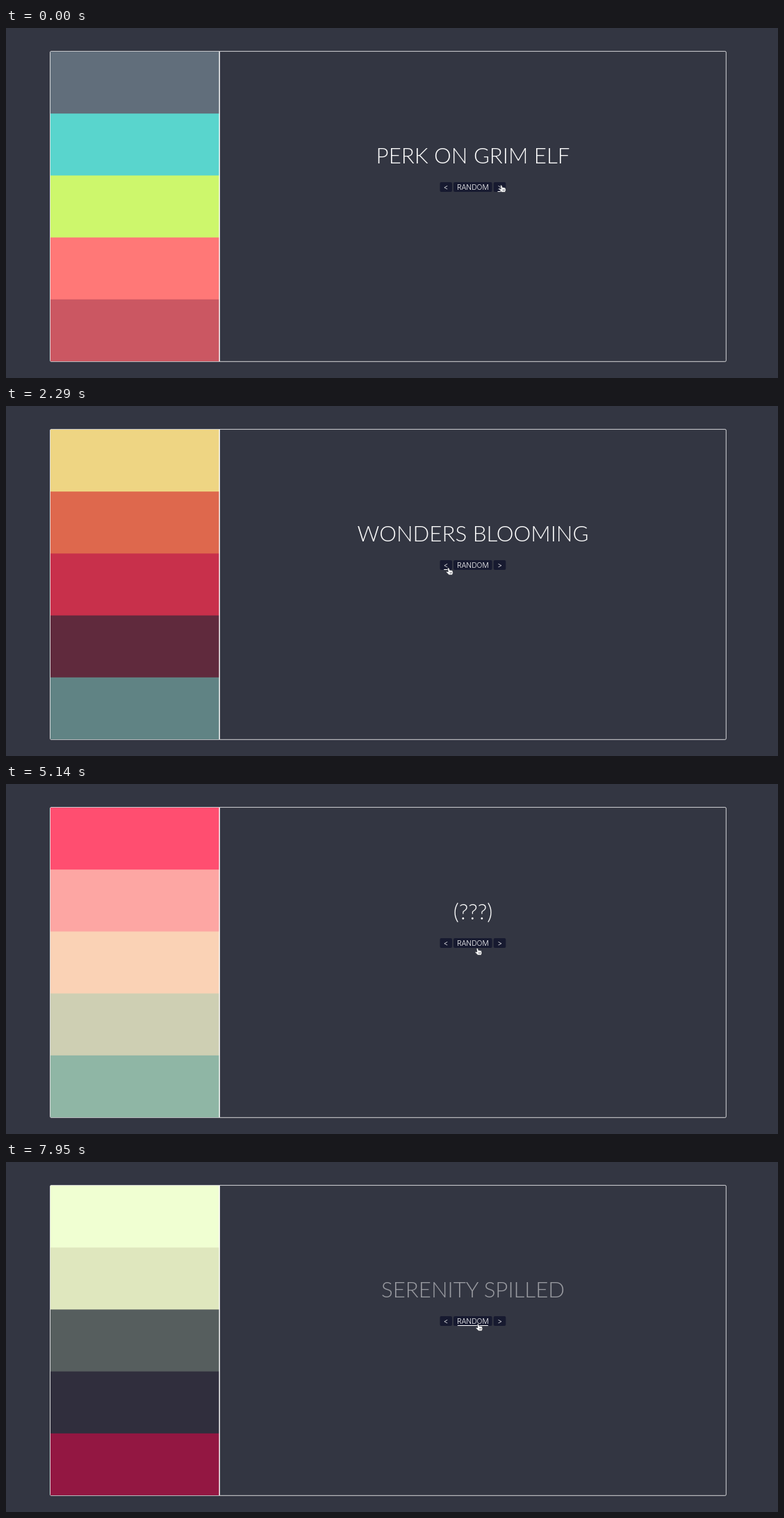
These frames come from a looping animation (1111 px wide and 504 px high, 8 s). An HTML page:

```html
<!DOCTYPE html>
<html lang="en">
<head>
<meta charset="utf-8">
<title>Palette browser</title>
<style>
  html, body { margin: 0; width: 100%; height: 100%; overflow: hidden; background: #333642; }
  svg { display: block; width: 1111px; height: 504px; }
  text { fill: #fff; text-anchor: middle; }
  #title { font: 300 31.25px Lato, sans-serif; }
  .button text { font: 300 10.3px Inter, sans-serif; }
  .button rect { fill: #171a30; }
  .button line { stroke: #fff; }
</style>
</head>
<body>
<svg viewBox="0 0 1111 504">
  <rect x="63.5" y="33.6" width="972.8" height="446.7" rx="1.5" fill="none" stroke="#fff" stroke-width=".8"/>
  <g id="swatches"></g>
  <rect x="306.5" y="34" width="1.4" height="446" fill="#fff"/>
  <text id="title" x="672" y="194.5"></text>
  <g id="buttons"></g>
  <g id="hand" stroke="#22242e" stroke-width=".7" stroke-linejoin="round">
    <path fill="#fff" d="M-1 1Q0-.6 1.2 1L2.2 3.8Q3.4 2.8 4.2 4Q5.6 3.4 6.4 4.8L6.9 7.6L5.8 10.4H1L-3 6.4Q-2.4 4.8-.2 6Z"/>
    <path fill="none" d="M2.5 6.4L2.9 8.6M4.4 6.2L4.7 8.4"/>
  </g>
</svg>
<script>
const LOOP = 8000, REFRESH = 150, COLOR_TIME = 440, FADE_OUT = 200, FADE_IN = 240;

// shown: first visible step of the change; lag: how far it has run by then
const scenes = [
  { shown: 0, lag: LOOP, title: "PERK ON GRIM ELF", colors: "616e7b 59d5cd cdf76c ff7877 cb5762" },
  { shown: 1720, lag: 65, title: "WONDERS BLOOMING", colors: "eed583 de684d c8304b 602a3d 608384" },
  { shown: 3370, lag: 180, title: "(???)", colors: "ff4e70 fda6a3 fad2b5 cecfb3 8fb6a5" },
  { shown: 6040, lag: 83, title: "SERENITY SPILLED", colors: "f0ffd2 dfe7be 615d5e 372d3c a31a44" },
  { shown: 7950, lag: 100, title: "", colors: "f0ffd2 dfe7be 07655e 003544 200034" }
].map(s => ({ ...s, colors: s.colors.split(" ").map(toRgb) }));

// Each move slows down towards (x, y) and sags by dip on the way
const home = { x: 712.5, y: 226 };
const moves = [
  { start: 100, end: 1420, x: 636.5, y: 232.8, dip: 16 },
  { start: 4150, end: 5140, x: 678, y: 236, dip: 21 },
  { start: 5200, end: 5590, x: 679, y: 232.8, dip: 0 }
];

const $ = id => document.getElementById(id);
const clamp = v => Math.max(0, Math.min(1, v));
const swing = v => 0.5 - 0.5 * Math.cos(Math.PI * clamp(v));
const easeOut = v => 1 - (1 - clamp(v)) ** 2;
const mix = (a, b, p) => a + (b - a) * p;

function toRgb(hex) {
  return [0, 2, 4].map(i => parseInt(hex.slice(i, i + 2), 16));
}

function add(parent, tag, attrs) {
  const node = document.createElementNS("http://www.w3.org/2000/svg", tag);
  for (const key in attrs) node.setAttribute(key, attrs[key]);
  return parent.appendChild(node);
}

// Every swatch reaches the bottom, so the next one covers it without a seam
const swatches = scenes[0].colors.map((_, i) =>
  add($("swatches"), "rect", { x: 64, y: 34 + i * 89.2, width: 243, height: 446 - i * 89.2 }));

const buttons = [["<", 633.2, 17.5], ["RANDOM", 671.8, 55.5], [">", 710.5, 17.5]]
  .map(([label, x, width]) => {
    const group = add($("buttons"), "g", { class: "button" });
    const half = width / 2, left = x - half, right = x + half;
    add(group, "rect", { x: left, y: 222, width, height: 14, rx: 2 });
    add(group, "text", { x, y: 232.8 }).textContent = label;
    const underline = add(group, "line", { x1: left + 5.8, x2: right - 5.8, y1: 235.5, y2: 235.5 });
    return { left, right, underline };
  });

function drawPalette(t) {
  const index = scenes.filter(s => s.shown <= t).length - 1;
  const next = scenes[index], prev = scenes[Math.max(0, index - 1)];
  const age = next.lag + Math.floor((t - next.shown) / REFRESH) * REFRESH;
  const p = swing(age / COLOR_TIME);
  swatches.forEach((node, i) => {
    const rgb = next.colors[i].map((c, k) => Math.round(mix(prev.colors[i][k], c, p)));
    node.setAttribute("fill", `rgb(${rgb})`);
  });
  const leaving = age < FADE_OUT;
  $("title").textContent = (leaving ? prev : next).title;
  $("title").setAttribute("opacity",
    leaving ? 1 - swing(age / FADE_OUT) : swing((age - FADE_OUT) / FADE_IN));
}

function drawPointer(t) {
  let { x, y } = home;
  for (const m of moves) {
    const p = easeOut((t - m.start) / (m.end - m.start));
    x = mix(x, m.x, p);
    y = mix(y, m.y, p) + m.dip * Math.sin(Math.PI * p);
  }
  $("hand").setAttribute("transform", `translate(${x} ${y})`);
  for (const b of buttons) {
    const hover = x > b.left && x < b.right && y > 222 && y < 235;
    b.underline.setAttribute("visibility", hover ? "visible" : "hidden");
  }
}

function frame() {
  const t = performance.now() % LOOP;
  drawPalette(t);
  drawPointer(t);
  requestAnimationFrame(frame);
}
frame();
</script>
</body>
</html>
```
